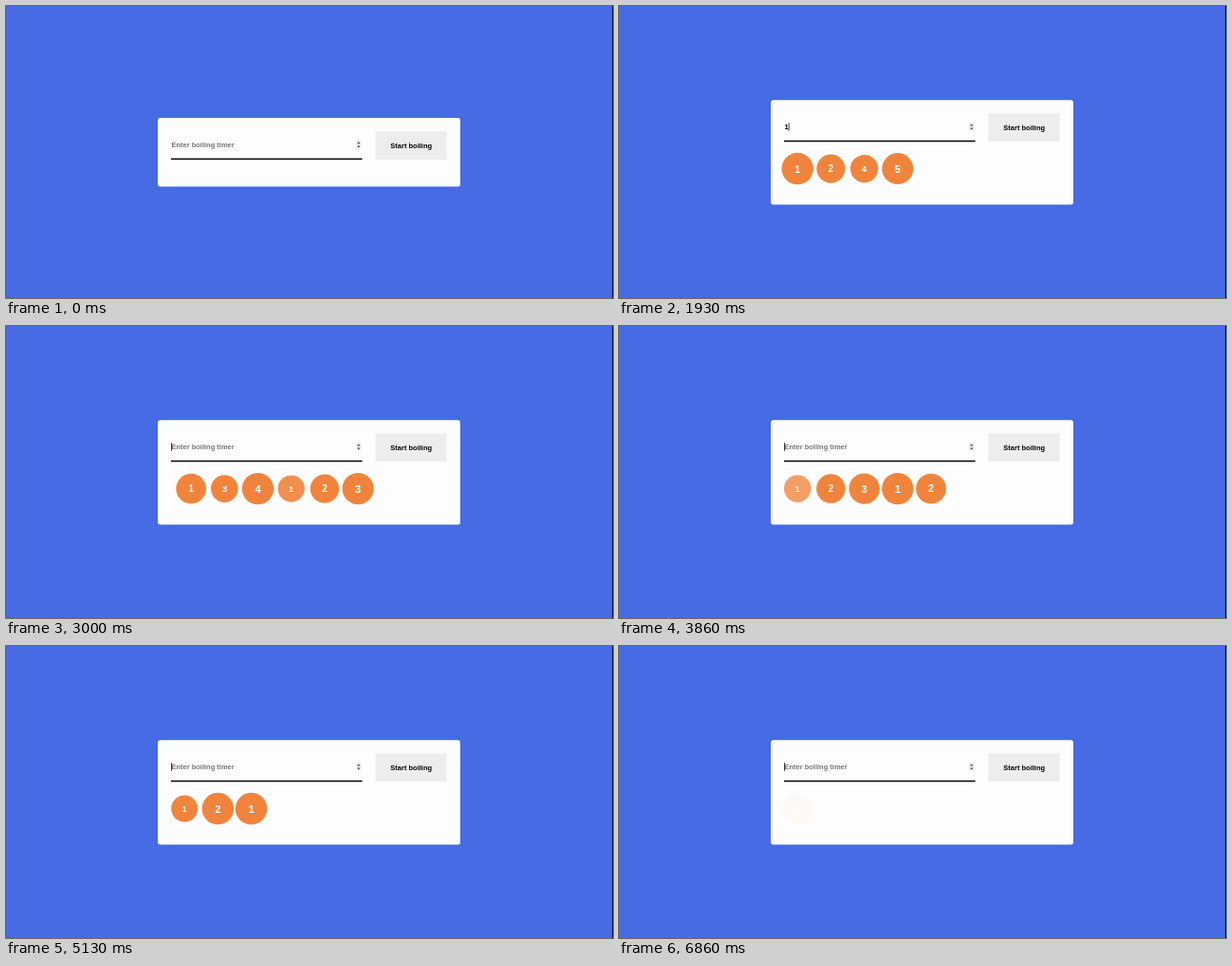
Recreate the animation shown at these times as an HTML page. Size 640 by 308 pixels, loop 7000 ms.

```html
<!DOCTYPE html>
<html lang="en">
<head>
<meta charset="utf-8">
<title>Boiling timer</title>
<style>
  html, body { margin: 0; width: 100%; height: 100%; overflow: hidden; background: #466be4; }
  svg { display: block; width: 100%; height: 100%; }
  text { font: bold 7.5px "Liberation Sans", Arial, sans-serif; }
  .egg circle { fill: #f1843d; }
  .egg text { font-size: 9.4px; fill: #fff; text-anchor: middle; }
</style>
</head>
<body>
<svg viewBox="0 0 640 308">
  <rect width="640" height="308" fill="#466be4"/>
  <rect x="639" width="1" height="308" fill="#10162c"/>
  <rect id="card" x="160" width="319" rx="2.5" fill="#fdfdfd"/>
  <g id="form">
    <text id="field" x="174.4" y="30.8"></text>
    <rect id="caret" y="24" width="0.8" height="8.6" fill="#111"/>
    <rect x="369" y="24" width="5.6" height="8.4" fill="#efefef"/>
    <path d="M370.1 27.2l1.7-2.2 1.7 2.2zM370.1 29.4l1.7 2.2 1.7-2.2z" fill="#505050"/>
    <rect x="174" y="42.5" width="201.6" height="1.6" fill="#0d0d12"/>
    <rect x="389.5" y="14" width="75.2" height="30" fill="#ededed"/>
    <text x="427.2" y="31.6" text-anchor="middle">Start boiling</text>
  </g>
  <g id="eggs"></g>
</svg>
<script>
  const LOOP = 7000, LAST_STEP = 103, STEP = 200 / 3;
  const FADE = 300, MOVE = 300, GAP = 35.2, RADIUS = 14;
  const NS = "http://www.w3.org/2000/svg";
  const $ = id => document.getElementById(id);

  // When each digit is typed and submitted, and its countdown in seconds
  const eggs = [
    [260, 530, 2], [680, 810, 3], [1070, 1200, 4], [1450, 1620, 5],
    [1850, 1970, 1], [2180, 2330, 2], [2510, 2660, 3]
  ].map(([typed, start, count]) => {
    const end = start + count * 1000;
    const node = add($("eggs"), "g");
    node.setAttribute("class", "egg");
    add(node, "circle").setAttribute("r", RADIUS);
    const label = add(node, "text");
    label.setAttribute("y", 3.4);
    return { typed, start, count, end, gone: end + FADE + 20, node, label };
  });

  function add(parent, tag) {
    return parent.appendChild(document.createElementNS(NS, tag));
  }

  // CSS "ease": cubic-bezier(.25, .1, .25, 1)
  function ease(x) {
    if (x <= 0) return 0;
    if (x >= 1) return 1;
    let lo = 0, hi = 1;
    const curve = (u, a, b) => 3 * u * (1 - u) * ((1 - u) * a + u * b) + u * u * u;
    for (let i = 0; i < 24; i++) {
      const mid = (lo + hi) / 2;
      if (curve(mid, .25, .25) < x) lo = mid; else hi = mid;
    }
    return curve(lo, .1, 1);
  }

  function pulse(age) {
    const p = age / 500 % 2;
    return 1 + .2 * (p < 1 ? ease(p) : 1 - ease(p - 1));
  }

  function drawForm(t) {
    const open = t >= eggs[0].start;
    const height = open ? 110.2 : 72.4, top = 154.3 - height / 2;
    $("card").setAttribute("y", top);
    $("card").setAttribute("height", height);
    $("form").setAttribute("transform", `translate(0 ${top})`);

    const current = eggs.find(e => t >= e.typed && t < e.start);
    $("field").textContent = current ? current.count : "Enter boiling timer";
    $("field").setAttribute("fill", current ? "#000" : "#757575");

    let input = 60;
    for (const e of eggs)
      for (const key of [e.typed, e.start]) if (key <= t) input = key;
    const lit = t >= input && (t - input) % 1000 < 500;
    $("caret").setAttribute("x", current ? 178.7 : 174.2);
    $("caret").setAttribute("visibility", lit ? "visible" : "hidden");
  }

  function drawEggs(t) {
    let x = 188.2;
    for (const e of eggs) {
      const shown = t >= e.start && t < e.gone;
      e.node.setAttribute("visibility", shown ? "visible" : "hidden");
      if (shown) {
        const age = t - e.start;
        const alpha = ease(age / FADE) * (1 - ease((t - e.end) / FADE));
        e.node.setAttribute("transform", `translate(${x} 171.6) scale(${pulse(age)})`);
        e.node.setAttribute("opacity", alpha);
        e.label.textContent = Math.max(1, e.count - Math.floor(age / 1000));
      }
      x += GAP * (1 - ease((t - e.gone) / MOVE));
    }
  }

  // The picture advances at 15 steps a second, on 10 ms ticks
  const tick = k => Math.floor(k * STEP / 10 + 1e-6) * 10;
  function snap(t) {
    let k = Math.floor(t / STEP);
    if (tick(k + 1) <= t) k++;
    return tick(Math.min(k, LAST_STEP));
  }

  function draw(t) {
    drawForm(t);
    drawEggs(t);
  }

  const begin = performance.now();
  function run() {
    draw(snap((performance.now() - begin) % LOOP));
    requestAnimationFrame(run);
  }
  run();
</script>
</body>
</html>
```
